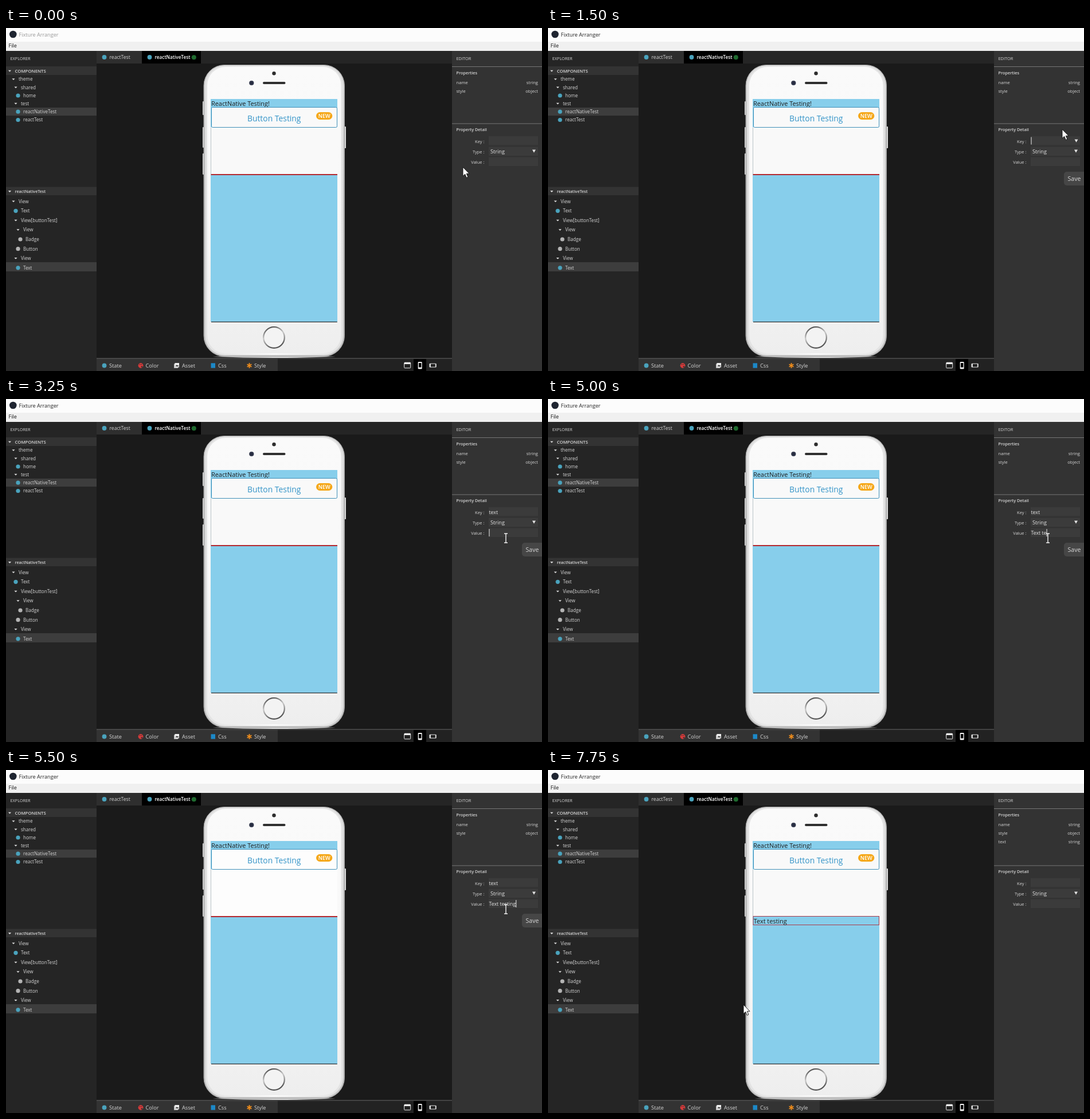
Recreate the animation shown at these times as an HTML page. Size 935 by 599 pixels, loop 8 s.

```html
<!DOCTYPE html>
<html lang="en">
<head>
<meta charset="utf-8">
<title>Fixture Arranger</title>
<style>
  html, body { margin: 0; width: 100%; height: 100%; overflow: hidden; background: #1a1a1a; }
  svg { display: block; width: 100%; height: 100%; }
  text { font-family: "Open Sans", "Noto Sans", sans-serif; white-space: pre; }
</style>
</head>
<body>
<svg id="stage" viewBox="0 0 935 599" preserveAspectRatio="none"></svg>
<script>
const LOOP = 8000, TICK = 250;
const CYAN = '#4aa3bd', PALE = '#b4b4b4', INK = '#d6d6d6';

const box = (x, y, w, h, fill, extra = '') =>
  `<rect x="${x}" y="${y}" width="${w}" height="${h}" fill="${fill}" ${extra}/>`;
const dot = (x, y, r, fill, extra = '') =>
  `<circle cx="${x}" cy="${y}" r="${r}" fill="${fill}" ${extra}/>`;
const label = (x, baseline, size, str, fill = INK, extra = '') =>
  `<text x="${x}" y="${baseline}" font-size="${size}" fill="${fill}" ${extra}>${str}</text>`;
const path = (d, fill, extra = '') => `<path d="${d}" fill="${fill}" ${extra}/>`;
const arrowDown = (x, y) => path(`M${x - 2.6} ${y - 1.3}h5.2l-2.6 2.9z`, '#ddd');
const selectArrow = (x, y) => path(`M${x - 3} ${y - 2.6}h6l-3 5.4z`, '#e4e4e4');
const BOLD = 'font-weight="600"', END = 'text-anchor="end"', MID = 'text-anchor="middle"';

// A row is [indent, centre y, name, icon colour]; rows without a colour are open folders.
const treeRow = ([x, y, name, color]) =>
  (color ? dot(x, y, 3.6, color) : arrowDown(x, y)) + label(x + 9, y + 2.9, 8.1, name);

const rows = [
  [13, 89.5, 'theme'], [17, 103.7, 'shared'], [21, 118, 'home', CYAN],
  [17, 132, 'test'], [21, 146.2, 'reactNativeTest', CYAN], [21, 160.5, 'reactTest', CYAN],
  [13, 302.7, 'View'], [17, 319.3, 'Text', CYAN], [17, 336, 'View[buttonTest]'],
  [21, 352.5, 'View'], [25, 369, 'Badge', PALE], [21, 385.7, 'Button', PALE],
  [17, 402.2, 'View'], [21, 418.8, 'Text', CYAN]
];

const property = (y, name, type) =>
  label(785.5, y, 7.6, name) + label(928, y, 7.6, type, INK, END);

const windowBars =
  box(0, 0, 935, 24, '#fcfcfc') + box(0, 24, 935, 16, '#f0f0f0') +
  dot(12.3, 11, 6.3, '#1f2531') +
  label(22.5, 14.7, 9.1, 'Fixture Arranger', '#222', 'id="title"') +
  label(4.5, 34.4, 9, 'File', '#111');

const sidebar =
  box(0, 40, 158, 559, '#252525') +
  box(0, 67, 158, 15, '#333') + box(0, 277.5, 158, 14.5, '#333') +
  box(0, 139, 158, 14, '#3d3d3d') + box(0, 409, 158, 16, '#3d3d3d') +
  label(7.5, 56, 7.3, 'EXPLORER') +
  arrowDown(6.5, 75) + label(15.5, 77.5, 7.8, 'COMPONENTS', INK, BOLD) +
  arrowDown(6.5, 285.3) + label(15.5, 287.8, 7.1, 'reactNativeTest', INK, BOLD) +
  rows.map(treeRow).join('');

const tabs =
  box(158, 40, 620, 22, '#252525') + box(158, 40, 79, 22, '#2e2e2e') + box(237, 40, 103, 22, '#000') +
  dot(171.5, 51, 3.9, CYAN) + label(180.5, 54.3, 8.6, 'reactTest') +
  dot(250.5, 51, 3.9, CYAN) + label(259.5, 54.3, 8.2, 'reactNativeTest', '#fff', BOLD) +
  dot(327.8, 51.2, 4, '#1f6b2f');

const spoke = angle =>
  `<path d="M424.5 585v9" stroke="#ef8d1c" stroke-width="1.9" transform="rotate(${angle} 424.5 589.5)"/>`;

const bottomBar =
  box(158, 577, 620, 22, '#222') + box(158, 577, 316, 22, '#333') + box(158, 576.5, 620, 1, '#666') +
  dot(171.5, 589.5, 3.9, CYAN) +
  dot(235, 589.5, 4.4, '#d43a3a') + dot(233.5, 587.6, .8, '#333') + dot(236.3, 587.5, .8, '#333') + dot(237, 591.5, 1.3, '#333') +
  box(293, 586.5, 7, 7.5, '#bbb') + box(294.5, 585, 7.5, 7.5, '#eee') + path('M295.5 591l2-3 1.5 1.5 1-1 1.3 2.5z', '#444') +
  box(357.5, 585.3, 7.5, 8.4, '#1c88c7') +
  [0, 60, 120].map(spoke).join('') +
  [[180, 'State'], [243.5, 'Color'], [307, 'Asset'], [370, 'Css'], [433, 'Style']]
    .map(([x, name]) => label(x, 592.9, 9.2, name)).join('') +
  box(711, 578, 22, 21, '#000') +
  box(694.7, 584.2, 11, 9.6, 'none', 'rx="1" stroke="#eee"') + box(695, 584, 10.5, 3, '#eee') +
  box(718.7, 583, 7, 12.5, '#f4f4f4', 'rx="1.3"') + box(720, 585, 4.4, 7.6, '#000') +
  box(739.2, 586.2, 10.8, 6, 'none', 'rx="1" stroke="#ddd"') + box(738.6, 586, 2.4, 6.4, '#ddd') + box(748.8, 586, 1.7, 6.4, '#ddd');

const phone =
  box(343, 128, 4, 24, '#ddd', 'rx="1"') + box(343, 173, 4, 36, '#ddd', 'rx="1"') +
  box(343, 219, 4, 37, '#ddd', 'rx="1"') + box(589, 172, 4, 38, '#ddd', 'rx="1"') +
  path('M360 574q107.500-4 215 0q-107.500 4-215 0', '#e4e4e4') +
  box(345, 64.5, 245.500, 509, 'url(#shell)', 'rx="36" stroke="#9c9c9c"') +
  box(347.5, 66.500, 240.500, 504.500, 'url(#rim)', 'rx="34"') +
  box(351, 68, 233.500, 500, 'url(#face)', 'rx="32"') +
  dot(467.5, 79.2, 3.2, '#2d2d2d') + dot(428.3, 96, 4.1, '#30364a') + dot(428.3, 96, 1.6, '#20253a') +
  box(448, 94, 39.500, 4, '#303030', 'rx="2"') +
  dot(467.5, 540.5, 18.3, '#f3f3f3', 'stroke="url(#ring)" stroke-width="2.2"') +
  box(359, 125, 218, 387.500, '#f7f7f7', 'stroke="#111" stroke-width="2"');

const preview = `<g id="preview">` +
  box(357, 124, 221, 389, '#87ceeb') + box(358, 512.800, 219.500, 1, '#222') +
  label(358, 136, 10.9, 'ReactNative Testing!', '#1c1c1c') +
  `<g id="paper" fill="#f9f9f9">` +
  `<rect x="357.5" y="173" width="220.500" height="83"/>` +
  `<rect x="358.5" y="138.500" width="219" height="35" rx="2" stroke="#3f8fb8"/></g>` +
  box(357, 174, 1, 81, '#b9c4c8') +
  label(467.7, 163, 13.9, 'Button Testing', '#3494c8', MID) +
  box(541, 147, 28.300, 13, '#f5a718', 'rx="6.5"') +
  label(555.2, 157, 9.2, 'NEW', '#fff', `${MID} ${BOLD}`) +
  box(357.500, 255, 220.500, 2, '#b3292f', 'id="emptyText"') +
  `<g id="filledText">` + box(358, 255.500, 219.500, 15, '#87ceeb', 'stroke="#ab3a4a"') +
  label(358.8, 268, 10.9, 'Text testing', '#1c1c1c') + `</g></g>`;

const editor =
  box(778, 40, 157, 559, '#333') + box(778, 67, 157, 1, '#777') + box(778, 166.500, 157, 1, '#777') +
  label(785.5, 56, 7.4, 'EDITOR') +
  label(785.5, 80.500, 7.3, 'Properties', INK, BOLD) + label(785.5, 180, 7.3, 'Property Detail', INK, BOLD) +
  property(98, 'name', 'string') + property(113, 'style', 'object') +
  `<g id="newProperty">${property(128, 'text', 'string')}</g>` +
  [['Key', 200.500], ['Type', 218.800], ['Value', 236.800]]
    .map(([name, y]) => label(834.5, y, 7.5, name + ' :', INK, END)).join('') +
  [189, 207.500, 225.500].map(y => box(842, y, 86, 15.500, '#3b3b3b')).join('') +
  label(845, 219, 9.2, 'String', '#e4e4e4') + selectArrow(921, 215) +
  `<g id="keyArrow">${selectArrow(921.5, 197)}</g>` +
  label(842.5, 200.800, 8.8, '', '#e4e4e4', 'id="keyText"') +
  label(842.5, 237, 8.8, '', '#e4e4e4', 'id="valueText"') +
  `<g id="save">` + box(900, 251, 40, 24, '#464646', 'rx="5"') + label(918, 267.200, 10.6, 'Save', INK, MID) + `</g>` +
  box(0, 0, 1, 13, '#eee', 'id="caret"');

const OUTLINE = 'stroke="#111" stroke-width=".9" stroke-linejoin="round"';
const pointers =
  `<g id="arrow">` + path('M0 0V15.500L3.700 12.200L6.200 18.300L8.800 17.200L6.300 11.300H11Z', '#fff', OUTLINE) + `</g>` +
  `<g id="beam">` + path('M-3-8h2.300l.7.7.7-.7H3M0-7.500V7.500M-3 8h2.300l.7-.7.7.7H3', 'none', 'stroke="#f2f2f2" stroke-width="1.4"') + `</g>` +
  `<g id="hand">` + path('M-2 1Q0-1.500 2 1V7Q4 5.500 5 7.500Q7 6.500 7.800 8.500Q10 8 10 10.500V15L8 20.500H-1L-5.500 13Q-6 10-3.800 10.500L-2 12.500Z', '#fff', OUTLINE) +
  path('M2 7v4M5 8v3.500M7.800 9v3', 'none', 'stroke="#333" stroke-width=".8"') + `</g>`;

const gradient = (id, direction, ...colors) =>
  `<linearGradient id="${id}" x1="0" y1="0" ${direction}>` +
  colors.map((c, i) => `<stop offset="${i / (colors.length - 1)}" stop-color="${c}"/>`).join('') +
  `</linearGradient>`;

const stage = document.getElementById('stage');
stage.innerHTML = `<defs>` +
  gradient('shell', 'x2="0" y2="1"', '#d8d8d8', '#bdbdbd', '#c8c8c8') +
  gradient('rim', 'x2="1" y2="0"', '#e2e2e2', '#fafafa', '#e2e2e2') +
  gradient('face', 'x2="0" y2="1"', '#fafafa', '#f8f8f8', '#eeeeee') +
  gradient('ring', 'x2=".35" y2="1"', '#333', '#c9c9c9', '#555') + `</defs>` +
  box(158, 40, 620, 559, '#1a1a1a') + windowBars + sidebar + tabs + phone + preview + bottomBar + editor + pointers;

const part = Object.fromEntries([...stage.querySelectorAll('[id]')].map(el => [el.id, el]));
const show = (id, visible) => part[id].setAttribute('visibility', visible ? 'visible' : 'hidden');

// Pointer stops: [tick, x, y, shape shown from that tick on].
const route = [
  [0, 797, 243, 'arrow'], [3, 885, 160, 'arrow'], [5, 803, 123, 'arrow'], [6, 897, 177, 'arrow'],
  [8, 897, 177, 'arrow'], [10, 882, 198, 'beam'], [13, 872, 243, 'beam'], [23, 872, 243, 'beam'],
  [25, 918, 266, 'hand'], [26, 922, 272, 'hand'], [28, 922, 272, 'arrow'], [31, 341, 410, 'arrow'], [32, 341, 410, 'arrow']
];

// Number of letters typed: the last entry whose tick has been reached.
const typed = (str, steps, tick) =>
  str.slice(0, steps.reduce((count, [at, n]) => tick >= at ? n : count, 0));

function movePointer(tick) {
  const i = route.findIndex(stop => stop[0] > tick) - 1;
  const [t0, x0, y0, shape] = route[i], [t1, x1, y1] = route[i + 1];
  const k = (tick - t0) / (t1 - t0);
  for (const id of ['arrow', 'beam', 'hand']) show(id, id === shape);
  part[shape].setAttribute('transform', `translate(${x0 + (x1 - x0) * k} ${y0 + (y1 - y0) * k})`);
}

function render(tick) {
  const saved = tick >= 28, editing = tick >= 6 && !saved, inKey = tick < 12;
  part.title.setAttribute('fill', tick < 2 ? '#999' : '#222');
  part.keyText.textContent = saved ? '' : typed('text', [[7, 1], [8, 2], [9, 3], [10, 4]], tick);
  part.valueText.textContent = saved ? '' :
    typed('Text testing', [[17, 1], [18, 3], [19, 4], [20, 7], [21, 10], [22, 12]], tick);

  const field = inKey ? part.keyText : part.valueText;
  part.caret.setAttribute('x', 842.5 + field.getComputedTextLength());
  part.caret.setAttribute('y', inKey ? 190.500 : 227);
  show('caret', editing && tick !== 15 && tick !== 16);
  show('keyArrow', editing && inKey);
  show('save', editing);
  show('newProperty', saved);

  const previewOn = tick !== 21;
  part.preview.setAttribute('display', previewOn ? 'inline' : 'none');
  part.paper.setAttribute('fill', tick > 21 && !saved ? '#fdfdfd' : '#f9f9f9');
  show('emptyText', !saved);
  show('filledText', saved);
  movePointer(tick);
}

const start = performance.now();
function loop() {
  render(Math.floor((performance.now() - start) % LOOP / TICK));
  requestAnimationFrame(loop);
}
loop();
</script>
</body>
</html>
```
